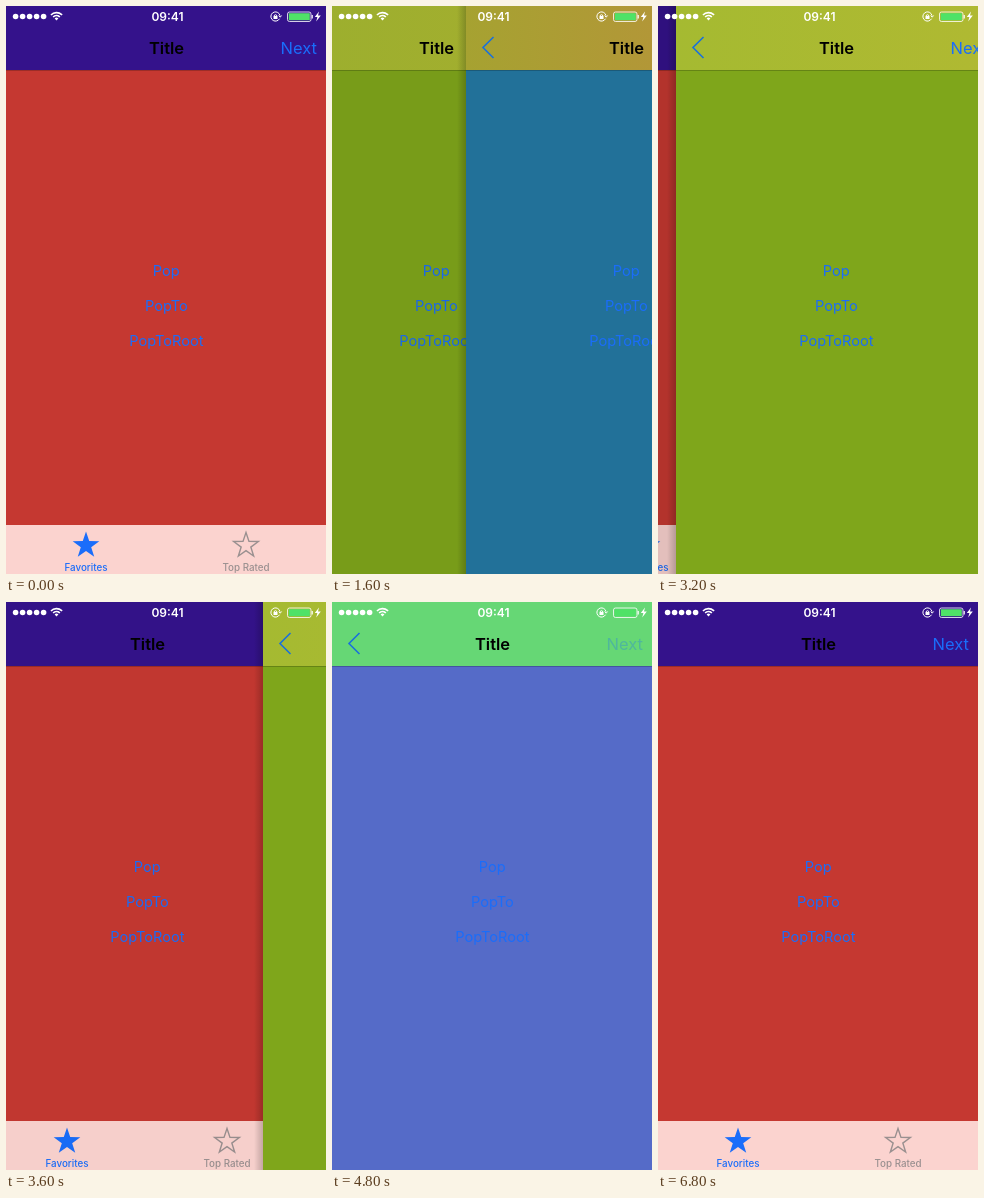
Recreate the animation shown at these times as an HTML page with a canvas. Size 320 by 568 pixels, loop 7 s.

```html
<!DOCTYPE html>
<html lang="en">
<head>
<meta charset="utf-8">
<title>Navigation</title>
<style>
  html, body { margin: 0; width: 100%; height: 100%; overflow: hidden; }
  canvas { display: block; width: 320px; height: 568px; }
</style>
</head>
<body>
<canvas id="stage"></canvas>
<script>
const W = 320, H = 568, LOOP = 7000, STEP = 100;
const BLUE = '#1a6dfa', GREY = '#9a9090';
const canvas = document.getElementById('stage');
const ctx = canvas.getContext('2d');
const ratio = window.devicePixelRatio || 1;
canvas.width = W * ratio;
canvas.height = H * ratio;

// body colour, bar colours from left to right
const red = { body: '#c53831', bar: ['#34128b', '#34128b'], root: true };
const green = { body: '#7fa61b', bar: ['#a5ba31', '#b0b932'] };
const teal = { body: '#227199', bar: ['#a6a231', '#bb8f3c'] };
const indigo = { body: '#556bc8', bar: ['#66d775', '#66d775'] };
const orange = { body: '#df6c34', bar: ['#8f6e45', '#997342'] };

const smooth = u => u * u * (3 - 2 * u);

const bez = (a, b, s) => 3 * a * s * (1 - s) ** 2 + 3 * b * s * s * (1 - s) + s ** 3;
function glide(u) {
  let lo = 0, hi = 1;
  for (let i = 0; i < 24; i++) {
    const mid = (lo + hi) / 2;
    if (bez(0.36, 0.04, mid) < u) lo = mid; else hi = mid;
  }
  return bez(0.66, 1, lo);
}

const moves = [
  { start: 700, dur: 600, ease: glide, under: red, top: green, push: true },
  { start: 1500, dur: 467, ease: glide, under: green, top: teal, push: true },
  { start: 2200, dur: 700, ease: smooth, under: green, top: teal },
  { start: 3100, dur: 700, ease: smooth, under: red, top: green },
  { start: 4300, dur: 400, ease: glide, under: red, top: indigo, push: true },
  { start: 4800, dur: 467, ease: glide, under: indigo, top: orange, push: true },
  { start: 5650, dur: 467, ease: glide, under: red, top: orange }
];

function text(str, x, y, size, color, weight = 400, align = 'center') {
  ctx.font = `${weight} ${size}px Inter, "Liberation Sans", sans-serif`;
  ctx.textAlign = align;
  ctx.fillStyle = color;
  ctx.fillText(str, x, y);
}

function line(points, color, width) {
  ctx.beginPath();
  points.forEach(p => ctx.lineTo(...p));
  ctx.strokeStyle = color;
  ctx.lineWidth = width;
  ctx.stroke();
}

function star(cx, cy, r, filled) {
  ctx.beginPath();
  for (let i = 0; i < 10; i++) {
    const a = (i / 5 - 0.5) * Math.PI, d = i % 2 ? r * 0.39 : r;
    ctx.lineTo(cx + d * Math.cos(a), cy + d * Math.sin(a));
  }
  ctx.closePath();
  ctx.lineWidth = 1.4;
  ctx.fillStyle = BLUE;
  ctx.strokeStyle = GREY;
  if (filled) ctx.fill(); else ctx.stroke();
}

function tabs() {
  ctx.fillStyle = '#fbd3cf';
  ctx.fillRect(0, 519, W, 49);
  star(80, 539.5, 14, true);
  star(240, 539.5, 13, false);
  text('Favorites', 80, 564.5, 9.8, BLUE, 500);
  text('Top Rated', 240, 564.5, 9.8, GREY, 500);
}

function page(p, x, pressed) {
  ctx.save();
  ctx.translate(x, 0);
  ctx.fillStyle = p.body;
  ctx.fillRect(0, 0, W, H);
  const g = ctx.createLinearGradient(0, 0, W, 0);
  p.bar.forEach((c, i) => g.addColorStop(i, c));
  ctx.fillStyle = g;
  ctx.fillRect(0, 0, W, 64);
  ctx.fillStyle = 'rgba(0,0,0,.3)';
  ctx.fillRect(0, 64, W, 0.7);

  text('Title', 160.5, 48, 16.5, '#000', 600);
  ctx.globalAlpha = pressed ? 0.3 : 1;
  text('Next', 311, 48, 16.5, BLUE, 400, 'right');
  ctx.globalAlpha = 1;
  if (!p.root) line([[27.5, 31], [17, 41.5], [27.5, 52]], '#1a70dc', 1.6);
  ['Pop', 'PopTo', 'PopToRoot'].forEach((s, i) => text(s, 160.3, 270 + 35 * i, 14.6, BLUE));
  if (p.root) tabs();
  ctx.restore();
}

function status() {
  const dot = (x, y, r) => { ctx.beginPath(); ctx.arc(x, y, r, 0, 7); };
  ctx.fillStyle = '#fff';
  for (let i = 0; i < 5; i++) { dot(9.6 + 7 * i, 10.5, 2.8); ctx.fill(); }

  ctx.strokeStyle = '#fff';
  ctx.lineWidth = 1.6;
  for (const r of [4.6, 7.6]) {
    ctx.beginPath();
    ctx.arc(50.5, 14.2, r, -Math.PI * 0.76, -Math.PI * 0.24);
    ctx.stroke();
  }
  ctx.beginPath();
  ctx.moveTo(50.5, 14.6);
  ctx.arc(50.5, 14.2, 2.6, -Math.PI * 0.76, -Math.PI * 0.24);
  ctx.fill();

  text('09:41', 161.5, 14.8, 12, '#fff', 600);

  ctx.lineWidth = 1;
  ctx.beginPath();
  ctx.arc(269.5, 10.5, 4.6, 0.5, 6.1);
  ctx.stroke();
  ctx.fillRect(267.5, 10, 4, 3);
  ctx.beginPath();
  ctx.arc(269.5, 10, 1.3, Math.PI, 0);
  ctx.stroke();
  line([[272.7, 9.5], [274.2, 11.2], [275.6, 9.5]], '#fff', 1);

  ctx.beginPath();
  ctx.roundRect(281.5, 6, 23.5, 9.5, 2);
  ctx.lineWidth = 0.8;
  ctx.stroke();
  ctx.fillRect(305.6, 9, 1.2, 3.5);
  ctx.fillStyle = '#4fe267';
  ctx.fillRect(282.8, 7.2, 21, 7);

  ctx.beginPath();
  [[313, 5.5], [308.8, 11], [311.4, 11], [310.2, 15.5], [314.8, 9.6], [312, 9.6]]
    .forEach(p => ctx.lineTo(...p));
  ctx.fillStyle = '#fff';
  ctx.fill();
}

function draw(t) {
  const m = moves.filter(v => v.start <= t).pop() || moves[moves.length - 1];
  const u = t < m.start ? 1 : Math.min(1, (t - m.start) / m.dur);
  const p = m.ease(u);
  const cover = m.push ? p : 1 - p;
  const x = Math.round(W * (1 - cover));

  ctx.setTransform(ratio, 0, 0, ratio, 0, 0);
  page(m.under, Math.round(-0.3 * W * cover), m.push);
  ctx.fillStyle = `rgba(0,0,0,${0.1 * cover})`;
  ctx.fillRect(0, 0, W, H);
  if (x < W) {
    const g = ctx.createLinearGradient(x - 9, 0, x, 0);
    g.addColorStop(0, 'rgba(0,0,0,0)');
    g.addColorStop(1, 'rgba(0,0,0,.2)');
    ctx.fillStyle = g;
    ctx.fillRect(x - 9, 0, 9, H);
    page(m.top, x, false);
  }
  status();
}

const begin = performance.now();
function tick() {
  const t = (performance.now() - begin) % LOOP;
  draw(Math.floor(t / STEP) * STEP);
  requestAnimationFrame(tick);
}
tick();
</script>
</body>
</html>
```
